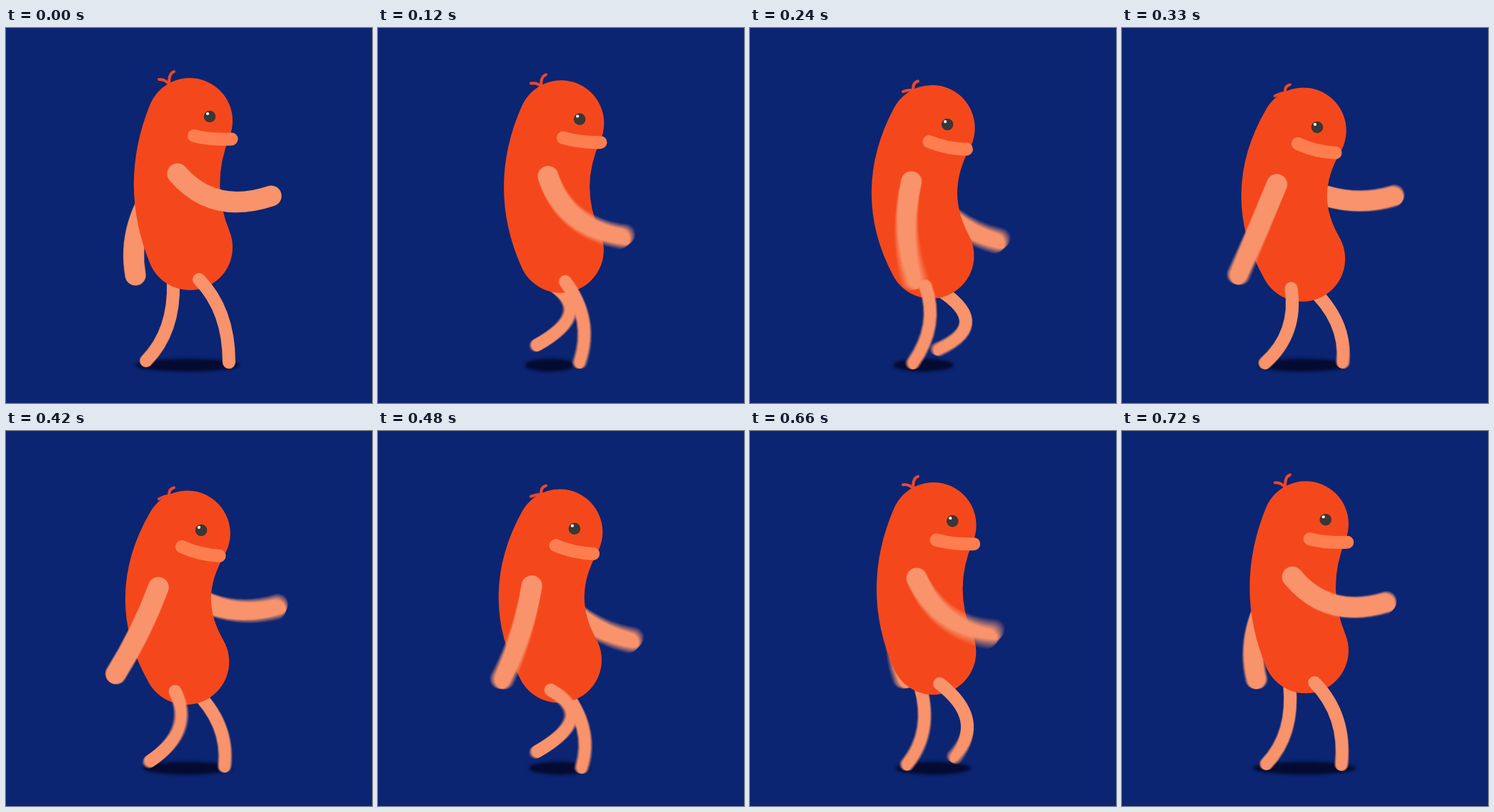
Recreate the animation shown at these times as an HTML page with a canvas. Size 512 px wide and 525 px high, loop 750 ms.

```html
<!DOCTYPE html>
<html lang="en">
<head>
<meta charset="utf-8">
<title>Walk cycle</title>
<style>
  html, body { margin: 0; width: 100%; height: 100%; overflow: hidden; background: #0b2573; }
  canvas { display: block; width: 512px; height: 525px; }
</style>
</head>
<body>
<canvas id="stage" width="512" height="525"></canvas>
<script>
const W = 512, H = 525, LOOP = 750, STEP = 30, SHUTTER = 15, SAMPLES = 15;
const SKIN = '#f8936b', BODY = '#f4481c', MOUTH = '#ff7e50', HAIR = '#ec472a';

const ctx = document.getElementById('stage').getContext('2d');
const layer = document.createElement('canvas');
layer.width = W;
layer.height = H;
const soft = layer.getContext('2d');

// Pose times; each track below holds one value per pose.
const TIMES = [0, 120, 240, 330, 405, 480, 600, 720];

const frontArm = {
  width: 29,
  root: w => [227 + 13 * w.cos + 4.7 * w.sin, 204 + 15.5 * w.dip],
  bendX: [290, 261, 210, 191, 188, 204, 234, 288],
  bendY: [262, 279, 284, 282, 281, 285, 285, 264],
  endX: [371, 342, 230, 163, 152, 174, 286, 369],
  endY: [235, 292, 352, 345, 339, 347, 333, 240]
};
const backArm = {
  width: 29,
  root: w => [231 - 9 * w.cos, 206 + 9 * w.dip],
  bendX: [168, 205, 277, 310, 305, 281, 225, 171],
  bendY: [275, 275, 280, 256, 264, 277, 280, 278],
  endX: [181, 232, 346, 380, 382, 354, 258, 188],
  endY: [346, 340, 298, 235, 238, 293, 338, 347]
};
const frontLeg = {
  width: 18,
  root: w => [252.7 + 17.3 * w.cos, 352 + 13 * w.dip],
  bendX: [312, 302, 265, 246, 256, 308, 343, 314],
  bendY: [395, 408, 416, 428, 424, 400, 408, 398],
  endX: [312, 282, 228, 200, 198, 222, 261, 307],
  endY: [468, 468, 469, 469, 465, 449, 445, 467]
};
const backLeg = {
  width: 18,
  root: w => [248.5 - 14.5 * w.cos, 356 + 6 * w.dip],
  bendX: [236, 305, 345, 315, 314, 302, 274, 241],
  bendY: [425, 398, 413, 410, 408, 415, 416, 425],
  endX: [196, 222, 263, 309, 309, 285, 241, 202],
  endY: [466, 444, 450, 468, 469, 471, 468, 466]
};
const shadow = {
  left: [180, 204, 199, 189, 187, 210, 223, 182],
  right: [328, 276, 286, 316, 320, 298, 290, 328]
};

const at = (list, i) => list[(i + list.length) % list.length];
const timeAt = i => at(TIMES, i) + LOOP * Math.floor(i / TIMES.length);

function slope(track, i) {
  const before = timeAt(i) - timeAt(i - 1), after = timeAt(i + 1) - timeAt(i);
  const v1 = (at(track, i) - at(track, i - 1)) / before;
  const v2 = (at(track, i + 1) - at(track, i)) / after;
  return (v1 * after + v2 * before) / (before + after);
}

// Smooth periodic curve through the poses of a track.
function sample(track, time) {
  const t = (time + LOOP) % LOOP;
  let i = TIMES.length - 1;
  while (TIMES[i] > t) i--;
  const h = timeAt(i + 1) - timeAt(i), u = (t - TIMES[i]) / h;
  const a = at(track, i), b = at(track, i + 1);
  const ease = u * u * (3 - 2 * u);
  return a + (b - a) * ease
    + h * u * (1 - u) * ((1 - u) * slope(track, i) - u * slope(track, i + 1));
}

function wave(time) {
  const angle = 2 * Math.PI * time / LOOP, cos = Math.cos(angle);
  return { cos, sin: Math.sin(angle), dip: (1 - cos) / 2 };
}

function curve(c, color, width, x0, y0, cx, cy, x1, y1) {
  c.strokeStyle = color;
  c.lineWidth = width;
  c.lineCap = 'round';
  c.beginPath();
  c.moveTo(x0, y0);
  c.quadraticCurveTo(cx, cy, x1, y1);
  c.stroke();
}

function disc(color, x, y, r) {
  ctx.fillStyle = color;
  ctx.beginPath();
  ctx.arc(x, y, r, 0, 2 * Math.PI);
  ctx.fill();
}

// Averages the limb over the open shutter, then tints the coverage.
function drawLimb(limb, time) {
  soft.globalCompositeOperation = 'source-over';
  soft.clearRect(0, 0, W, H);
  soft.globalCompositeOperation = 'lighter';
  soft.globalAlpha = 1 / SAMPLES;
  for (let i = 0; i < SAMPLES; i++) {
    const t = time + SHUTTER * ((i + 0.5) / SAMPLES - 0.5);
    const [x, y] = limb.root(wave(t));
    curve(soft, SKIN, limb.width, x, y,
      sample(limb.bendX, t), sample(limb.bendY, t),
      sample(limb.endX, t), sample(limb.endY, t));
  }
  soft.globalAlpha = 1;
  soft.globalCompositeOperation = 'source-in';
  soft.fillStyle = SKIN;
  soft.fillRect(0, 0, W, H);
  ctx.drawImage(layer, 0, 0);
}

function drawShadow(time) {
  const left = sample(shadow.left, time), right = sample(shadow.right, time);
  ctx.save();
  ctx.filter = 'blur(2px)';
  ctx.fillStyle = '#040a30';
  ctx.beginPath();
  ctx.ellipse((left + right) / 2, 472, (right - left) / 2 - 1, 9, 0, 0, 2 * Math.PI);
  ctx.fill();
  ctx.restore();
}

function drawBody(d) {
  const baseY = 79 + 12 * d;
  curve(ctx, HAIR, 4, 228.5, baseY, 227, 64 + 18 * d, 235, 61 + 19 * d);
  curve(ctx, HAIR, 4, 228.5, baseY, 222, 71 + 21 * d, 214, 72 + 24 * d);
  curve(ctx, BODY, 120, 257 - 3.4 * d, 130 + 14 * d,
    221 - 21 * d, 219 + 16 * d, 257 - 5 * d, 307 + 16.6 * d);

  const eyeX = 285 - 12.4 * d, eyeY = 124 + 15.5 * d;
  disc('#3a3736', eyeX, eyeY, 8.3);
  disc('#ffffff', eyeX - 3, eyeY - 4, 2.1);

  const shift = 17.6 * d;
  curve(ctx, MOUTH, 18, 263 - shift, 151 + 11.4 * d,
    288 - shift, 157 + 17 * d, 315.5 - shift, 155.5 + 20 * d);
}

function draw(time) {
  ctx.fillStyle = '#0b2573';
  ctx.fillRect(0, 0, W, H);
  drawShadow(time);
  drawLimb(backArm, time);
  drawLimb(backLeg, time);
  drawBody(wave(time).dip);
  drawLimb(frontArm, time);
  drawLimb(frontLeg, time);
}

function tick(now) {
  draw(Math.floor((now % LOOP) / STEP) * STEP);
  requestAnimationFrame(tick);
}
draw(0);
requestAnimationFrame(tick);
</script>
</body>
</html>
```
